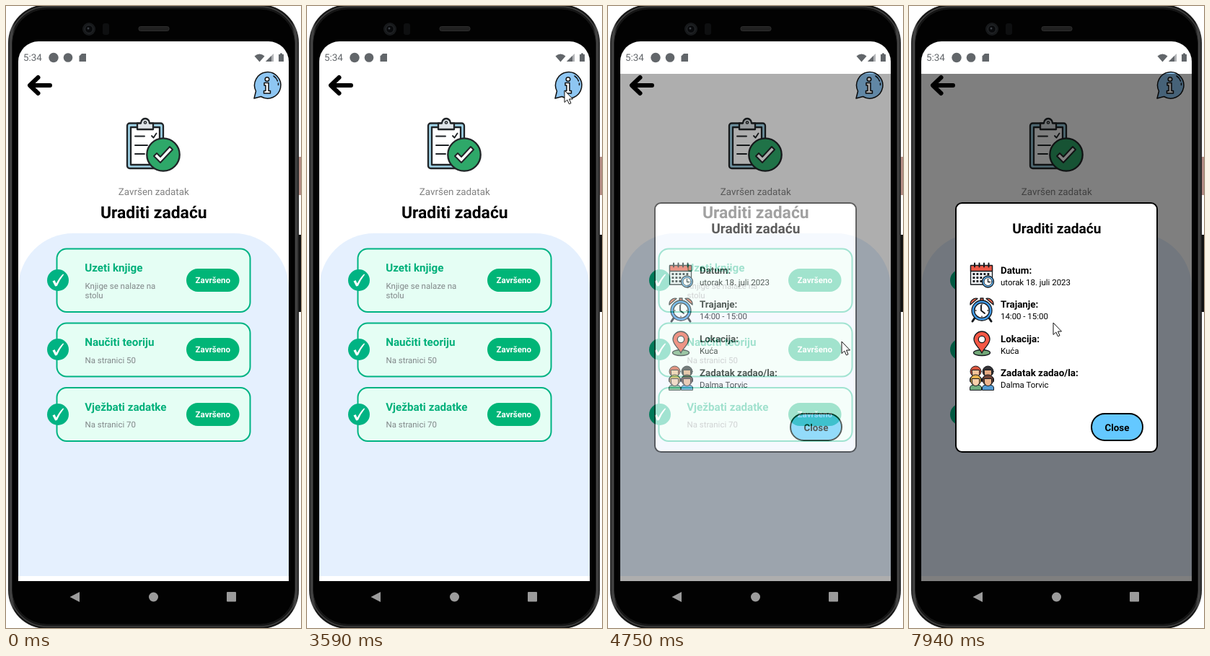
An HTML page that plays this animation: 409 px wide and 862 px high, repeating every 8000 ms.

```html
<!DOCTYPE html>
<html lang="bs">
<head>
<meta charset="utf-8">
<title>Zadatak</title>
<style>
html, body { margin: 0; width: 100%; height: 100%; overflow: hidden; background: #fff; }
svg { display: block; font-family: Roboto, "Noto Sans", sans-serif; text-rendering: geometricPrecision; }
.b { font-weight: 700; }
.m { text-anchor: middle; }
.ink { stroke: #15191d; stroke-width: 1.3; stroke-linejoin: round; stroke-linecap: round; }
</style>
</head>
<body>
<svg width="409" height="862" viewBox="0 0 409 862">
  <defs>
    <linearGradient id="edge" x2="1" y2="0">
      <stop offset="0" stop-color="#1c1c1c"/><stop offset=".012" stop-color="#4a4a4a"/>
      <stop offset=".024" stop-color="#161616"/><stop offset=".976" stop-color="#161616"/>
      <stop offset=".988" stop-color="#4a4a4a"/><stop offset="1" stop-color="#1c1c1c"/>
    </linearGradient>
  </defs>

  <!-- phone -->
  <rect x="405" y="209" width="4" height="53" fill="#b38c84"/>
  <rect x="405" y="317" width="4" height="107" fill="#111"/>
  <rect x="3" y="-2" width="403" height="865" rx="53" fill="url(#edge)"/>
  <rect x="5.500" y="1" width="398" height="859" rx="51" fill="none" stroke="#414141" stroke-width="1.500"/>
  <rect x="8.500" y="4" width="392" height="853" rx="48" fill="#020202" stroke="#171717"/>
  <circle cx="115" cy="32" r="9" fill="#17191b"/>
  <circle cx="115" cy="32" r="5.500" fill="#090a0c" stroke="#292c2f"/>
  <circle cx="114" cy="31" r="1.500" fill="#3c4147"/>
  <rect x="134" y="24" width="9" height="16" rx="3" fill="#0e0f10"/>
  <rect x="184" y="28.500" width="42" height="6" rx="2.500" fill="#202020" stroke="#2d2d2d"/>
  <path d="M17 797V77a28 28 0 0 1 28-28H364a28 28 0 0 1 28 28V797z" fill="#fff"/>

  <!-- status bar -->
  <g fill="#62666a">
    <text x="24" y="76" font-size="13.370">5:34</text>
    <circle cx="66" cy="71.500" r="6.700"/>
    <circle cx="86" cy="71.500" r="6.300"/>
    <path d="M105 66h6v11h-9.500v-7.500z"/>
    <path d="M344.500 69.500q7-6 14 0l-7 8z"/>
    <path d="M371 66v11h-11z" fill="#aeb0b3"/><path d="M368 69v8h-8z"/>
    <path d="M380 65.500h3v1.500h2v10h-7v-10h2z"/>
  </g>

  <!-- header -->
  <path d="M34 110H61M44.500 99L33 110L44.500 121" fill="none" stroke="#000" stroke-width="6" stroke-linecap="round" stroke-linejoin="round"/>
  <g id="info" stroke="#111" stroke-width="1.500" stroke-linejoin="round">
    <path d="M344 128l2.500-10a18.200 18.200 0 1 1 7 7.500z" fill="#8ec6f2"/>
    <path d="M371 97q4 2.500 5.500 7M377.500 107v2.500" fill="none" stroke-linecap="round"/>
    <circle cx="362" cy="101.500" r="2.800" fill="#fff"/>
    <path d="M358 106.500h6v11h2.500v3.500h-9v-3.500h2.500v-7.500h-2z" fill="#fff"/>
  </g>
  <g stroke="#202427" stroke-width="2.300" stroke-linejoin="round" stroke-linecap="round">
    <rect x="168" y="162.500" width="50" height="62.500" rx="3.500" fill="#9ed2e6"/>
    <path d="M173 168h40v52h-40z" fill="#fff"/>
    <path d="M182 171v-8.500h5a6 6.500 0 0 1 12 0h5v8.500z" fill="#dfe5e9"/>
    <circle cx="193" cy="161.500" r="1.600" fill="#fff" stroke-width="1.500"/>
    <path d="M179 180.500h13M179 193h17M179 205h13M202 180l2.500 2.500 4-6" fill="none" stroke-width="1.900"/>
    <circle cx="218" cy="206" r="22.700" fill="#2ea869"/>
    <path d="M205 208l4-4 5 5 13-14 4 4-17 18z" fill="#fff" stroke-width="1.900"/>
  </g>
  <text class="m" x="204.800" y="262" font-size="13.370" fill="#808080">Završen zadatak</text>
  <text class="m b" x="204.800" y="294" font-size="22.900">Uraditi zadaću</text>

  <!-- task list -->
  <path d="M17 790V391a76 76 0 0 1 76-76H316a76 76 0 0 1 76 76V790z" fill="#e5f0fe"/>
  <g id="cards"></g>

  <!-- navigation -->
  <g fill="#9b9b9b">
    <path d="M88.500 819l13.500-7v14z"/>
    <circle cx="204.500" cy="819" r="6.500"/>
    <rect x="306" y="812" width="13" height="13.500" rx="1"/>
  </g>

  <!-- dialog -->
  <g id="dialog">
    <path d="M17 94H392V797H17z" opacity=".5"/>
    <rect x="65" y="273" width="279" height="345" rx="8.500" fill="#fff" stroke="#000" stroke-width="1.900"/>
    <text class="m b" x="204.800" y="315" font-size="19.100">Uraditi zadaću</text>
    <g id="rows"></g>
    <g class="ink">
      <g transform="translate(101 373)">
        <path d="M-15.500-13h30v26h-30z" fill="#f3f5f7"/>
        <path d="M-15.500-13.500h30v8h-30z" fill="#ee5947"/>
        <path d="M-10-16.500v5M-3.500-16.500v5M3-16.500v5M9.500-16.500v5" stroke-width="2"/>
        <path d="M-12.500-1.500h25M-12.500 3.500h17M-12.500 8.500h13" fill="none" stroke-width="3" stroke-dasharray="2.800 2.200" stroke-linecap="butt"/>
        <circle cx="8.500" cy="9" r="8" fill="#62b4f3"/>
        <circle cx="8.500" cy="9" r="5.500" fill="#fff" stroke-width=".9"/>
        <path d="M8.500 5.500v4h3" fill="none"/>
      </g>
      <g transform="translate(101 421)">
        <path d="M-9 10l-4 6M9 10l4 6" stroke-width="3"/>
        <path d="M-16-7a8 8 0 0 1 10-8.500zM16-7a8 8 0 0 0-10-8.500z" fill="#ef674d"/>
        <path d="M-2-16h4v4h-4z" fill="#ef674d"/>
        <circle cy="1" r="14" fill="#409be9"/>
        <circle cy="1" r="10.300" fill="#fff"/>
        <path d="M-1-6V1l5 4" fill="none" stroke-width="1.900"/>
        <path d="M0-8v1M0 9v1M-9 1h1M8 1h1" fill="none"/>
      </g>
      <g transform="translate(101 468)">
        <ellipse cy="12.500" rx="11.500" ry="4" fill="#72a878"/>
        <path d="M0 13C-3 6-11 1-11-6a11 11 0 0 1 22 0C11 1 3 6 0 13z" fill="#f45745"/>
        <circle cy="-6" r="4.700" fill="#fff"/>
      </g>
      <g id="people" transform="translate(101 515.500)" stroke-width="1"></g>
    </g>
    <rect x="253" y="565" width="71" height="37" rx="18.500" fill="#64c8ff" stroke="#000" stroke-width="1.900"/>
    <text class="m b" x="288.500" y="588.500" font-size="13.370">Close</text>
  </g>

  <path id="cursor" d="M0 0V16.500L3.800 13L6.400 18.800L9 17.700L6.500 12H11.500z" fill="#fff" stroke="#111"/>
</svg>
<script>
const $ = id => document.getElementById(id);

function card(y, title, lines) {
  const h = 60.5 + lines.length * 13.5, mid = Math.round(y + h / 2);
  const notes = lines.map((s, i) =>
    `<text x="109.500" y="${y + 55.5 + i * 13.7}" font-size="11.460" fill="#818789">${s}</text>`).join('');
  return `<rect x="70.500" y="${y + .5}" width="268" height="${h}" rx="13.500" fill="#e5fef4" stroke="#00b383" stroke-width="2"/>
    <text class="b" x="109.200" y="${y + 32}" font-size="15.200" fill="#00b07a">${title}</text>${notes}
    <rect x="250" y="${mid - 16}" width="73.500" height="32" rx="16" fill="#00b577"/>
    <text class="m b" x="286.800" y="${mid + 4.3}" font-size="11.600" fill="#fff">Završeno</text>
    <circle cx="72" cy="${mid}" r="15" fill="#00b383"/>
    <path transform="translate(72 ${mid})" fill="#fff" d="M-7.500 1.500L-4.500 0L-2.300 4.500Q2-4 7-8.500L8.300-8Q2 0-1.200 8L-3.800 8.500z"/>`;
}

$('cards').innerHTML =
  card(336, 'Uzeti knjige', ['Knjige se nalaze na', 'stolu']) +
  card(439, 'Naučiti teoriju', ['Na stranici 50']) +
  card(528.5, 'Vježbati zadatke', ['Na stranici 70']);

$('rows').innerHTML = [
  ['Datum:', 'utorak 18. juli 2023'],
  ['Trajanje:', '14:00 - 15:00'],
  ['Lokacija:', 'Kuća'],
  ['Zadatak zadao/la:', 'Dalma Torvic']
].map(([label, value], i) => {
  const y = 371 + i * 47.4;
  return `<text class="b" x="127" y="${y}" font-size="13.370">${label}</text>
    <text x="127" y="${y + 16}" font-size="11.460">${value}</text>`;
}).join('');

const person = (x, y, hair, skin, top) =>
  `<path d="M${x - 8} ${y + 12.5}v-3q0-4 8-4t8 4v3z" fill="${top}"/>
   <circle cx="${x}" cy="${y - 1}" r="7.500" fill="${hair}"/>
   <path d="M${x - 5} ${y - 3}h10v5a5 5 0 0 1-10 0z" fill="${skin}"/>`;

$('people').innerHTML =
  person(-8.5, -8, '#d9573f', '#f6c49b', '#63b3e4') +
  person(8.5, -8, '#353236', '#e8ab82', '#ef6650') +
  person(-8.5, 4, '#e9b34e', '#f9cfaa', '#70ad7f') +
  person(8.5, 4, '#704337', '#eeb68e', '#549bd3');

// Pointer stops: time, x, y
const stops = [
  [530, 337, 657], [1100, 135, 150], [1500, 289, 262], [1900, 150, 275],
  [2270, 267, 395], [2830, 340, 153], [3250, 296, 216], [3590, 357, 117],
  [3920, 357, 117], [4270, 317, 481], [4480, 324, 465], [5080, 324, 465],
  [5500, 172, 309], [5910, 264, 314], [6400, 131, 386], [6750, 238, 384],
  [7330, 138, 438], [7660, 142, 440], [7940, 200, 439]
];

const clamp = v => Math.min(1, Math.max(0, v));
const ease = u => u * u * (3 - 2 * u);

// Each leg adds its share of the way to the next stop
function pointer(t) {
  let [, x, y] = stops[0];
  for (let i = 1; i < stops.length; i++) {
    const [t0, x0, y0] = stops[i - 1], [t1, x1, y1] = stops[i];
    const u = ease(clamp((t - t0) / (t1 - t0)));
    x += (x1 - x0) * u;
    y += (y1 - y0) * u;
  }
  return [x, y];
}

// The dialog appears in four visible steps
const fade = t => clamp((Math.floor((t - 4620) / 65) + 1) / 4) ** 1.6;
const press = t => 1 - .5 * Math.sin(Math.PI * clamp((t - 3900) / 300));

function draw(t) {
  const [x, y] = pointer(t);
  $('cursor').setAttribute('transform', `translate(${x} ${y})`);
  $('cursor').setAttribute('visibility', t < 530 ? 'hidden' : 'visible');
  $('dialog').setAttribute('opacity', fade(t));
  $('info').setAttribute('opacity', press(t));
}

const start = performance.now();
function tick() {
  draw((performance.now() - start) % 8000);
  requestAnimationFrame(tick);
}
tick();
</script>
</body>
</html>
```
